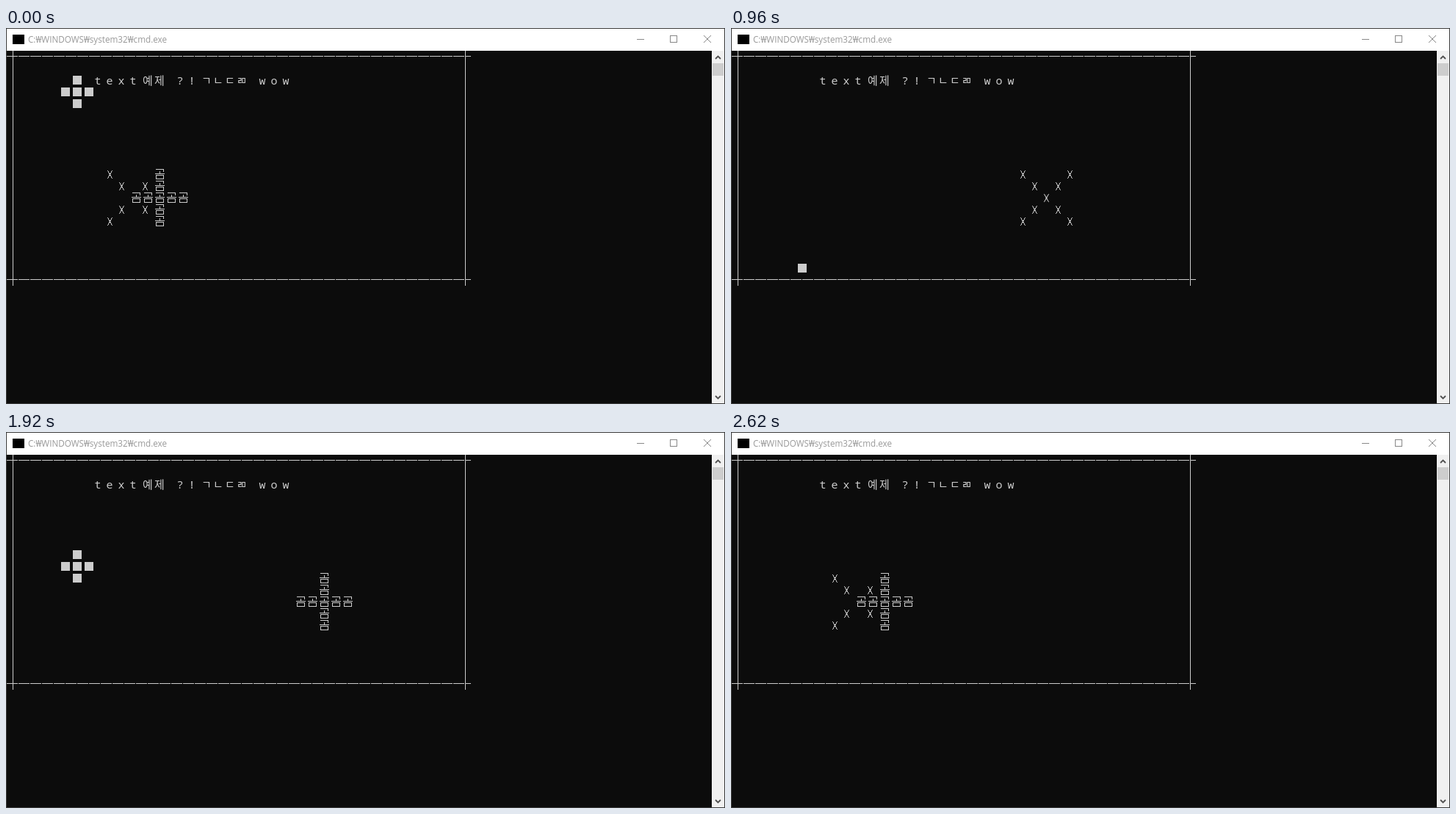
Recreate the animation shown at these times as an HTML page. Size 979 by 512 pixels, loop 2730 ms.

```html
<!DOCTYPE html>
<html lang="ko">
<head>
<meta charset="utf-8">
<title>Console</title>
<style>
  html, body { margin: 0; width: 100%; height: 100%; overflow: hidden; background: #0c0c0c; }
  svg { display: block; width: 979px; height: 512px; }
  text { white-space: pre; }
  .title { font: 11.7px "Open Sans", "Noto Sans", "Noto Sans CJK KR", sans-serif; fill: #999; }
  .line { font: 300 15px "Noto Sans Mono", "Noto Sans Mono CJK KR", "Noto Sans CJK KR", monospace;
          fill: #ccc; text-anchor: middle; }
  .thin { fill: none; stroke-width: 1; shape-rendering: crispEdges; }
  .pen { stroke: #ccc; }
</style>
</head>
<body>
<svg viewBox="0 0 979 512" xmlns="http://www.w3.org/2000/svg">
  <defs>
    <g id="block"><rect width="16" height="16" fill="#0c0c0c"/><rect x="2" y="2" width="12" height="12" fill="#ccc"/></g>
    <g id="ex"><rect width="8" height="16" fill="#0c0c0c"/><path class="thin pen" d="M1.5 3L7.5 14M7.5 3L1.5 14"/></g>
    <g id="bear"><rect width="16" height="16" fill="#0c0c0c"/>
      <path class="thin pen" d="M3 1.5H13.5V5M8.5 4V7.5M2 7.5H15M3.5 9.5H13.5V14.5H3.5Z"/></g>
  </defs>

  <!-- window -->
  <rect width="979" height="512" fill="#3a3a3a"/>
  <rect x="1" y="1" width="977" height="30" fill="#fff"/>
  <rect x="1" y="31" width="960" height="480" fill="#0c0c0c"/>
  <rect x="9" y="9" width="16" height="13" fill="#000"/>
  <text class="title" x="30" y="20">C:₩WINDOWS₩system32₩cmd.exe</text>
  <path class="thin" stroke="#888" d="M859 15.5H869M904.5 10.5H913.5V19.5H904.5Z"/>
  <path fill="none" stroke="#888" d="M950 10L960 20M960 10L950 20"/>

  <!-- scrollbar -->
  <rect x="961" y="31" width="17" height="480" fill="#f0f0f0"/>
  <rect x="962" y="48" width="15" height="17" fill="#cdcdcd"/>
  <path fill="none" stroke="#505050" stroke-width="1.8" d="M966 42L969.5 38.5L973 42M966 501L969.5 504.5L973 501"/>

  <!-- console -->
  <text class="line" y="77">t e x t 예제  ? ! ㄱㄴㄷㄻ  w o w</text>
  <g id="sprites"></g>
  <path class="thin pen" stroke-dasharray="15 1" d="M1 38.5H633M1 342.5H633"/>
  <path class="thin pen" d="M9.5 31V351M625.5 31V351"/>
</svg>
<script>
const LOOP = 2730;
// [start ms, tick, even steps until the next row]
const STEPS = [
  [0, 0, 1], [50, 1, 3], [210, 4, 1], [270, 5, 4], [530, 9, 1], [600, 11, 1],
  [720, 13, 6], [1090, 20, 1], [1140, 21, 3], [1350, 24, 1], [1420, 25, 4],
  [1650, 29, 1], [1720, 30, 1], [1780, 31, 5], [2160, 38, 1], [2230, 39, 1],
  [2300, 40, 5], [2620, 46, 1], [LOOP, 46, 1]
];
const mod = (a, n) => ((a % n) + n) % n;

// Lay the text line out on the console grid: 8px narrow, 16px wide.
const line = document.querySelector('.line');
let pen = 121;
line.setAttribute('x', [...line.textContent].map(ch => {
  const w = ch > '\u1000' ? 16 : 8;
  pen += w;
  return pen - w / 2;
}).join(' '));

// Arms of the shapes, in cells around the centre.
const plus = n => {
  const cells = [[0, 0]];
  for (let i = 1; i <= n; i++) cells.push([i, 0], [-i, 0], [0, i], [0, -i]);
  return cells;
};
const cross = n => {
  const cells = [[0, 0]];
  for (let i = 1; i <= n; i++) cells.push([i, i], [-i, i], [i, -i], [-i, -i]);
  return cells;
};

// Each shape wraps far outside the box; columns run 0..37, rows 1..18.
const shapes = [
  { tile: 'block', cells: plus(1), at: k => [5, mod(k + 6, 26) - 3] },
  { tile: 'ex', cells: cross(2), at: k => [mod(k + 13, 46) - 3, 12] },
  { tile: 'bear', cells: plus(2), at: k => [mod(15 - k, 46) - 3, 12] }
];
const layer = document.getElementById('sprites');
for (const s of shapes) {
  s.nodes = s.cells.map(() => {
    const use = document.createElementNS('http://www.w3.org/2000/svg', 'use');
    use.setAttribute('href', '#' + s.tile);
    return layer.appendChild(use);
  });
}

function tickAt(t) {
  let i = 0;
  while (STEPS[i + 1][0] <= t) i++;
  const [t0, k0, n] = STEPS[i], [t1, k1] = STEPS[i + 1];
  const step = Math.floor((t - t0) / (t1 - t0) * n);
  return k0 + Math.floor((k1 - k0) * step / n);
}

function draw(tick) {
  for (const s of shapes) {
    const [cx, cy] = s.at(tick);
    s.cells.forEach(([dx, dy], i) => {
      const col = cx + dx, row = cy + dy, node = s.nodes[i];
      const inside = col >= 0 && col <= 37 && row >= 1 && row <= 18;
      node.setAttribute('x', 9 + col * 16);
      node.setAttribute('y', 31 + row * 16);
      node.style.display = inside ? '' : 'none';
    });
  }
}

let start, last;
function frame(now) {
  start ??= now;
  const tick = tickAt(mod(now - start, LOOP));
  if (tick !== last) draw(last = tick);
  requestAnimationFrame(frame);
}
draw(0);
requestAnimationFrame(frame);
</script>
</body>
</html>
```
